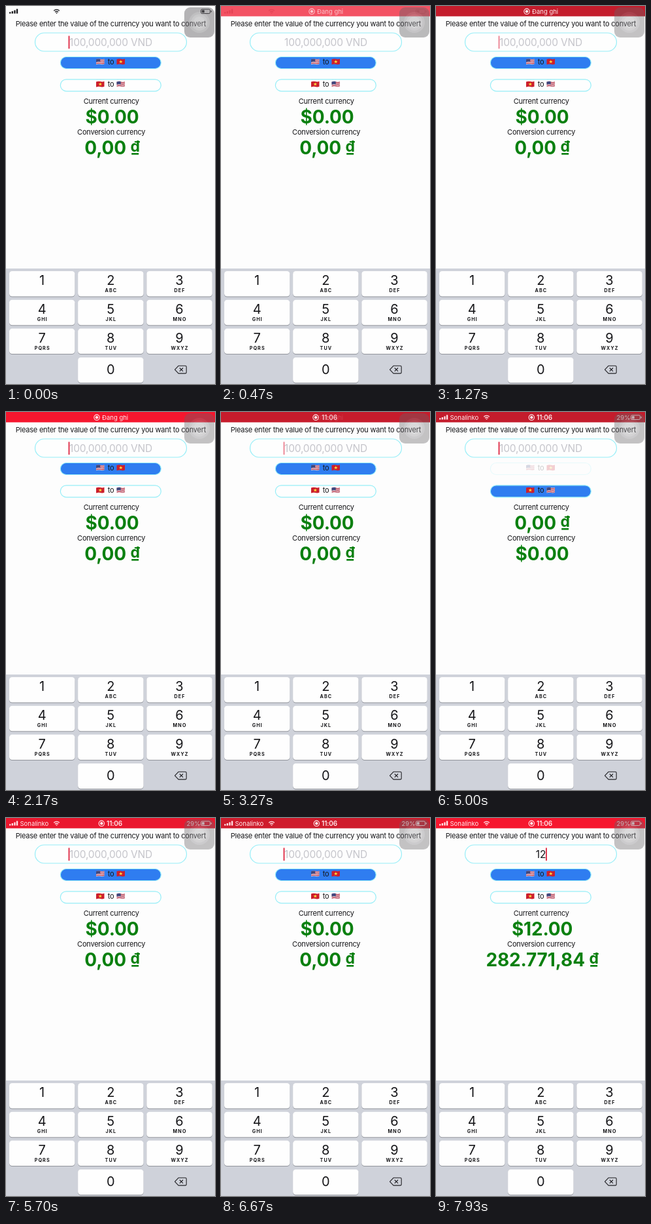
An HTML page for the animation above (8000 ms loop, 320 px wide and 576 px high).

```html
<!DOCTYPE html>
<html lang="en">
<head>
<meta charset="utf-8">
<title>Currency converter</title>
<style>
  html, body { margin: 0; height: 100%; overflow: hidden; background: #fdfdfd; }
  svg { display: block; width: 100vw; height: 100vh; }
  text { font-family: Inter, Roboto, sans-serif; fill: #17171a; text-anchor: middle; }
  .label { font-size: 11px; letter-spacing: -.22px; }
  .amount { font-size: 28px; font-weight: 700; letter-spacing: -.15px; fill: #0b8010; }
  .amount .sign { font-size: 23px; }
  .field { font-size: 15.5px; letter-spacing: -.2px; }
  .hint { fill: #c5c5cb; }
  .digit { font-size: 20px; }
  .letters { font-size: 7.2px; font-weight: 700; letter-spacing: 1.1px; }
  .status text { font-size: 9.5px; fill: #ffecee; text-anchor: start; }
  .status .clock { font-weight: 600; font-size: 10px; letter-spacing: -.1px; }
  .outline { stroke: #96eef8; stroke-width: 1.2; }
</style>
</head>
<body>
<svg id="stage" viewBox="0 0 320 576" preserveAspectRatio="none">
  <defs>
    <g id="us">
      <path d="M0 1.200q3.200-1.500 6.500-.5t6-.4v8q-3 1.300-6 .4t-6.500.5z" fill="#dfc9ce"/>
      <path d="M.2 2.500q3.200-1.500 6.300-.5t6-.4M.2 5q3.200-1.500 6.300-.5t6-.4M.2 7.700q3.200-1.500 6.300-.5t6-.4"
            fill="none" stroke="#c2455a" stroke-width="1.200"/>
      <path d="M0 1.200q3.200-1.500 6.200-.5v4.300q-3-1-6.200.4z" fill="#41497f"/>
    </g>
    <g id="vn">
      <path d="M0 1.200q3.200-1.500 6.500-.5t6-.4v8q-3 1.300-6 .4t-6.500.5z" fill="#cc1f2c"/>
      <path d="M6.300 1.800l.7 2h2.100l-1.600 1.300.6 2-1.800-1.200-1.800 1.200.6-2-1.600-1.300h2.100z" fill="#fbdc3c"/>
    </g>
    <g id="signals">
      <path d="M6.2 11.5V9.2M9.8 11.5V8M13.4 11.5V6.4M17 11.5V4.6" stroke="currentColor" stroke-width="2.4"/>
      <g fill="none" stroke="currentColor" stroke-width="1.4">
        <path d="M73.2 7.2q4.3-3.6 8.6 0M75 9.3q2.5-2 5 0"/>
        <path d="M76.6 10.8h1.8"/>
        <rect x="298.5" y="5" width="14" height="6.5" rx="1.7" stroke-width="1"/>
        <path d="M314.3 7v2.6" stroke-width="1.2"/>
      </g>
      <rect x="299.8" y="6.3" width="4" height="4" rx=".6" fill="currentColor"/>
    </g>
  </defs>

  <rect width="320" height="576" fill="#fdfdfd"/>
  <g class="status">
    <use href="#signals" id="idleSignals" color="#1d1d20"/>
    <rect id="bar" width="320" height="15.7"/>
    <g id="carrier" color="#ffdfe3">
      <use href="#signals"/>
      <text x="21.5" y="11.8">Sonalinko</text>
      <text x="276.5" y="11.8">29%</text>
    </g>
    <g id="record">
      <circle cy="8.3" r="4.2" fill="none" stroke="#ffecee" stroke-width="1.1"/>
      <circle cy="8.3" r="2.2" fill="#ffecee"/>
    </g>
    <text id="recording" x="147" y="11.8">Đang ghi</text>
    <text id="clock" class="clock" x="154" y="12">11:06</text>
  </g>

  <text class="label" x="160.5" y="30.5">Please enter the value of the currency you want to convert</text>
  <rect class="outline" x="44.5" y="41" width="232" height="28" rx="14" fill="#fefefe"/>
  <text id="field" x="160.5" y="61"></text>
  <rect id="caret" y="45.5" width="1.8" height="19.5" fill="#de2440"/>
  <g id="buttons"></g>
  <text class="label" x="161.2" y="149">Current currency</text>
  <text class="amount" id="current" x="162.6" y="178.5"></text>
  <text class="label" x="161.2" y="195.5">Conversion currency</text>
  <text class="amount" id="converted" x="162.6" y="225.5"></text>

  <g id="assist">
    <rect x="273" y="2" width="46" height="46" rx="9" fill="#666468"/>
    <g fill="#fff" fill-opacity=".16">
      <circle cx="296" cy="25" r="16"/>
      <circle cx="296" cy="25" r="12.5"/>
      <circle cx="296" cy="25" r="9"/>
    </g>
  </g>

  <rect y="400" width="320" height="176" fill="#cfd2da"/>
  <g id="keys"></g>
  <path d="M264 548.3h10.5q1.7 0 1.7 1.7v8.2q0 1.7-1.7 1.7h-10.5l-5.5-5.8zM265.8 551.5l5.2 5.2m0-5.2l-5.2 5.2"
        fill="none" stroke="#222226" stroke-width="1.1" stroke-linejoin="round"/>
</svg>
<script>
const LOOP = 8000;
const RATE = 23564.32;
const TO_DONG = 0, TO_DOLLAR = 1;
const $ = id => document.getElementById(id);
const ramp = (t, from, to) => Math.min(1, Math.max(0, (t - from) / (to - from)));
const fade = (id, opacity) => $(id).setAttribute('opacity', opacity);

// Taps select a direction on release; keystrokes extend the entered value.
const taps = [
  { button: TO_DOLLAR, down: 3980, up: 4120 },
  { button: TO_DONG, down: 4830, up: 5030 }
];
const strokes = [{ key: '1', at: 7050 }, { key: '2', at: 7550 }];

const letters = ['', 'ABC', 'DEF', 'GHI', 'JKL', 'MNO', 'PQRS', 'TUV', 'WXYZ'];
function key(digit, x, y, caption) {
  const digitY = y + (caption === undefined ? 25.7 : 21);
  return `<rect x="${x}" y="${y + 1}" width="100.5" height="38.5" rx="4.5" fill="#92959c"/>
    <rect id="key${digit}" x="${x}" y="${y}" width="100.5" height="38.5" rx="4.5"/>
    <text class="digit" x="${x + 50.2}" y="${digitY}">${digit}</text>
    <text class="letters" x="${x + 50.8}" y="${y + 32}">${caption || ''}</text>`;
}
$('keys').innerHTML = letters.map((caption, i) =>
  key(i + 1, 4.9 + i % 3 * 105.2, 404 + Math.floor(i / 3) * 43.8, caption)
).join('') + key(0, 110.1, 535.5);

$('buttons').innerHTML = [['us', 'vn'], ['vn', 'us']].map(([from, to], i) => {
  const y = 77.5 + i * 34.3;
  return `<g id="button${i}">
    <rect class="outline" id="fill${i}" x="83.3" y="${y}" width="154" height="18" rx="9"/>
    <use href="#${from}" x="138" y="${y + 2.6}"/>
    <text class="label" x="160.5" y="${y + 11}">to</text>
    <use href="#${to}" x="169.5" y="${y + 2.6}"/>
  </g>`;
}).join('');

const dollars = value => '$' + value.toFixed(2);
const dong = value => value.toLocaleString('de-DE', {
  minimumFractionDigits: 2, maximumFractionDigits: 2
}) + ' <tspan class="sign" dy="-4">₫</tspan>';

const shown = {};
function setMarkup(id, markup) {
  if (shown[id] !== markup) $(id).innerHTML = shown[id] = markup;
}

function drawStatus(t) {
  const shade = .5 + .5 * Math.cos((t - 2170) / 1920 * 2 * Math.PI);
  const swap = ramp(t, 3080, 3310);
  const started = ramp(t, 250, 550);
  $('bar').setAttribute('fill', `rgb(${196 + 50 * shade},${28 - 6 * shade},${44 + 2 * shade})`);
  fade('bar', started);
  fade('idleSignals', 1 - started);
  fade('record', started);
  fade('recording', started * (1 - swap));
  fade('clock', swap);
  fade('carrier', ramp(t, 3330, 3550));
  fade('assist', .48 - .1 * ramp(t, 100, 900));
  $('record').setAttribute('transform', `translate(${139 + 7.3 * swap})`);
}

function drawButtons(t) {
  let selected = TO_DONG;
  const opacity = [1, 1];
  for (const { button, down, up } of taps) {
    if (t >= up) selected = button;
    opacity[button] -= .8 * ramp(t, down, down + 120) * (1 - ramp(t, up, up + 220));
  }
  opacity.forEach((value, i) => {
    fade('button' + i, value);
    $('fill' + i).setAttribute('fill', i === selected ? '#2f7df0' : '#fefefe');
  });
  return selected;
}

function drawEntry(t, selected) {
  const entry = strokes.filter(s => t >= s.at).map(s => s.key).join('');
  const value = Number(entry);
  setMarkup('field', entry || '100,000,000 VND');
  $('field').setAttribute('class', entry ? 'field' : 'field hint');
  setMarkup('current', selected === TO_DONG ? dollars(value) : dong(value));
  setMarkup('converted', selected === TO_DONG ? dong(value * RATE) : dollars(value / RATE));

  const phase = t % 1000;
  const blink = Math.max(1 - ramp(phase, 200, 370), ramp(phase, 550, 670));
  $('caret').setAttribute('x', entry ? 159.2 + 4.4 * entry.length : 95.6);
  fade('caret', entry ? 1 : blink);

  for (let digit = 0; digit < 10; digit++) {
    const pressed = strokes.some(s => s.key === String(digit) && t >= s.at - 70 && t < s.at + 60);
    $('key' + digit).setAttribute('fill', pressed ? '#b6b9c1' : '#fefefe');
  }
}

function draw(now) {
  const t = now % LOOP;
  drawStatus(t);
  drawEntry(t, drawButtons(t));
  requestAnimationFrame(draw);
}
draw(performance.now());
</script>
</body>
</html>
```
